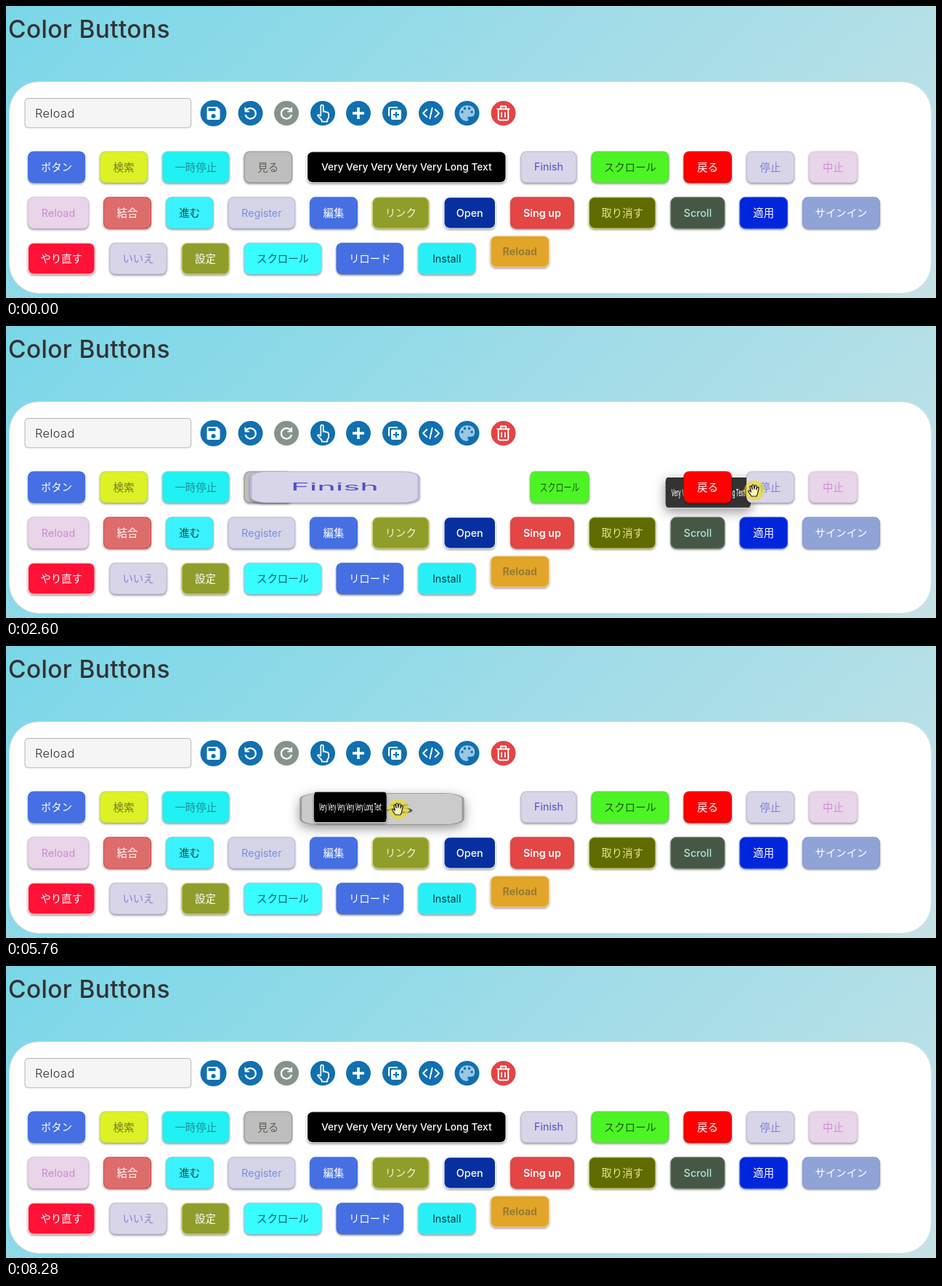
Animation, 1280 px wide and 403 px high, one loop 9.11 s. Source, as an HTML page with a canvas:

```html
<!DOCTYPE html>
<html lang="ja">
<head>
<meta charset="utf-8">
<title>Color Buttons</title>
<style>
html, body { margin: 0; width: 100%; height: 100%; overflow: hidden; }
canvas { display: block; }
</style>
</head>
<body>
<canvas id="stage" width="1280" height="403"></canvas>
<script>
const ctx = document.getElementById('stage').getContext('2d');
const LOOP = 9110, H = 43.8, GAP = 20, LAG = 28;
const SANS = 'Inter, "Noto Sans CJK JP", "Noto Sans CJK", sans-serif';
const CJK = '"Noto Sans CJK JP", "Noto Sans CJK", sans-serif';

// label, width, fill, text, border, weight
const ROWS = [
  [
    ['ボタン', 79, '#456fe2', '#fff'],
    ['検索', 66, '#dcf126', '#737c22', '#c9dc45', 300],
    ['一時停止', 92.5, '#20f1f3', '#1f8f98', '#55dfe6', 300],
    ['見る', 66.5, '#bebebe', '#5f5f54', '#8f8f8f', 300],
    ['Very Very Very Very Very Long Text', 274.5, '#000', '#fff', '#fff', 500],
    ['Finish', 77, '#d9d5e9', '#4f4dcb', '#b9b5df', 400],
    ['スクロール', 107, '#4df425', '#1b5a17', '#62d943', 300],
    ['戻る', 66.5, '#ff0000', '#fff', '#e00000'],
    ['停止', 66, '#d9d5e9', '#7d7fd4', '#bfbbe2', 300],
    ['中止', 67, '#e8d5e7', '#d58bdc', '#dcc3dd', 300]
  ],
  [
    ['Reload', 84, '#e8d5e7', '#cf86dd', '#dcc3dd', 400],
    ['結合', 66, '#dd6d6d', '#fff', '#e04545'],
    ['進む', 65.5, '#3af2ff', '#11505a', '#5adbe8'],
    ['Register', 92.5, '#d5d5e8', '#6f93e2', '#b9bce0', 400],
    ['編集', 66, '#456fe2', '#fff'],
    ['リンク', 78.5, '#8f9d2b', '#f5f5d8', '#d8dc60'],
    ['Open', 71.5, '#0630a0', '#fff', '#fff', 500],
    ['Sing up', 88, '#e44545', '#fff', '#e44545', 600],
    ['取り消す', 92.5, '#606c00', '#e8e48a', '#d8d860'],
    ['Scroll', 75, '#475745', '#a8e6dc', '#5d7a60', 500],
    ['適用', 66.5, '#0026dc', '#fff', '#2b4be8'],
    ['サインイン', 107, '#8fa3d6', '#fff', '#7f9ade']
  ],
  [
    ['やり直す', 92.5, '#ff1236', '#fff', '#fbd5da'],
    ['いいえ', 79, '#d9d5e9', '#8a80dd', '#bfbbe2', 300],
    ['設定', 66, '#8f9d2b', '#fff', '#d8dc60'],
    ['スクロール', 107, '#38fdff', '#12606e', '#6fd9ee', 300],
    ['リロード', 92.5, '#456fe2', '#fff'],
    ['Install', 79.5, '#26f0f5', '#113a44', '#5fe3ea', 400],
    ['Reload', 81.5, '#e2a52a', '#8d7a2e', '#f3dcae', 600]
  ]
];

const buttons = [];
ROWS.forEach((row, r) => {
  let x = 30;
  row.forEach(([label, w, fill, text, border = fill, weight = 400], i) => {
    const lifted = r === 2 && i === 6;
    buttons.push({ label, x, w, y: 200.5 + 63.1 * r - (lifted ? 9.7 : 0), fill, text, border, weight });
    x += w + GAP;
  });
});

// Pointer: time, x, y
const PATH = [
  [100, 1068, 376], [400, 880, 280], [790, 686, 221], [1199, 686, 221], [1200, 618, 221],
  [1350, 640, 220], [1500, 745, 218], [1700, 857, 217], [2200, 918, 219], [2600, 1030, 227],
  [3120, 1052, 224], [3540, 1046, 222], [3740, 955, 219], [4040, 803, 217], [4440, 640, 220],
  [4640, 607, 220], [4740, 600, 221], [5040, 385, 222], [5140, 366, 222], [5560, 366, 222],
  [5760, 540, 225], [5860, 610, 225], [6260, 614, 224], [6360, 625, 224], [6560, 595, 225],
  [6760, 492, 225], [7060, 385, 223], [7460, 366, 222], [7700, 366, 222], [8280, 915, 380]
];

// Each drag: active button, held time, grab point, [time, hovered slot]
const DRAGS = [
  { active: 4, from: 1200, to: 4740, grab: [607, 219], over: [[1400, 5], [1500, 6], [4240, 5], [4440, 4]] },
  { active: 3, from: 5560, to: 7460, grab: [359, 222], over: [[5660, 4], [6960, 3]] }
];
// Neighbours giving way: button, slot taken, start, end
const SHIFTS = [[5, 4, 1400, 4440], [6, 5, 1500, 4240], [4, 3, 5660, 6960]];

// The screen refreshes only at these moments
const TICKS = [0, 790, 1200, 1350, 3120, 7580];
[[100, 700], [1400, 2200], [2300, 3000], [3540, 4440], [4640, 5440],
 [5560, 5860], [6260, 6360], [6560, 7460], [7780, 8280]].forEach(([a, b]) => {
  for (let t = a; t <= b; t += 100) TICKS.push(t);
});
const snap = t => Math.max(...TICKS.filter(k => k <= t));

const clamp = v => Math.min(1, Math.max(0, v));
const ease = v => { const k = clamp(v); return k * k * (3 - 2 * k); };

function pointer(t) {
  const n = PATH.findIndex(p => p[0] > t);
  if (n <= 0) return PATH[n ? PATH.length - 1 : 0].slice(1);
  const a = PATH[n - 1], b = PATH[n], k = (t - a[0]) / (b[0] - a[0]);
  return [a[1] + (b[1] - a[1]) * k, a[2] + (b[2] - a[2]) * k];
}

const slotScale = (i, slot) => (buttons[slot].w + GAP) / (buttons[i].w + GAP);

// Offset and horizontal scale of every button
function layout(t) {
  const poses = buttons.map(() => ({ dx: 0, dy: 0, sx: 1, held: false }));
  for (const [i, slot, on, off] of SHIFTS) {
    const p = ease((t - on + 60) / 200) * (1 - ease((t - off) / 200));
    poses[i].dx = p * (buttons[slot].x - buttons[i].x);
    poses[i].sx = 1 + p * (slotScale(i, slot) - 1);
  }
  for (const d of DRAGS) {
    if (t < d.from || t >= d.to + 200) continue;
    const at = Math.min(t, d.to);
    const [x, y] = pointer(Math.max(d.from, at - LAG));
    const back = 1 - ease((t - d.to) / 200);
    let slot = d.active;
    for (const [when, s] of d.over) if (at >= when) slot = s;
    Object.assign(poses[d.active], {
      dx: (x - d.grab[0]) * back, dy: (y - d.grab[1]) * back,
      sx: slotScale(d.active, slot), held: t < d.to
    });
  }
  return poses;
}

function hits(b, p, [x, y]) {
  const cx = b.x + b.w / 2 + p.dx, top = b.y + p.dy;
  return Math.abs(x - cx) <= b.w * p.sx / 2 && y >= top && y <= top + H;
}

function roundRect(x, y, w, h, r) {
  ctx.beginPath();
  ctx.roundRect(x, y, w, h, r);
}

function shadow(color, blur, y) {
  ctx.shadowColor = color;
  ctx.shadowBlur = blur;
  ctx.shadowOffsetY = y;
}

function drawButton(b, p, hover) {
  const alpha = p.held ? 0.8 : hover ? 0.86 : 1;
  ctx.save();
  ctx.translate(b.x + b.w / 2 + p.dx, b.y + H / 2 + p.dy);
  ctx.scale(p.sx, 1);
  ctx.globalAlpha = alpha;
  if (p.held) shadow('rgba(0,0,0,.5)', 15, 5);
  else if (hover) shadow('rgba(0,0,0,.4)', 7, 3);
  else shadow('rgba(0,0,0,.42)', 3, 1.5);
  roundRect(-b.w / 2, -H / 2, b.w, H, 8);
  ctx.fillStyle = b.border;
  ctx.fill();
  shadow('transparent', 0, 0);
  roundRect(-b.w / 2 + 1, -H / 2 + 1, b.w - 2, H - 2, 7);
  if (alpha < 1) {
    ctx.globalAlpha = 1;
    ctx.fillStyle = '#fff';
    ctx.fill();
    ctx.globalAlpha = alpha;
  }
  ctx.fillStyle = b.fill;
  ctx.fill();
  const latin = b.label.charCodeAt(0) < 128;
  const size = latin ? (b.label.length > 20 ? 13.7 : 14.3) : 14.4;
  ctx.font = `${b.weight} ${size}px ${latin ? SANS : CJK}`;
  ctx.textAlign = 'center';
  ctx.globalAlpha = 1;
  ctx.fillStyle = b.text;
  ctx.fillText(b.label, 0, latin ? 5 : 5.2);
  ctx.restore();
}

const dot = (x, y, r) => `M${x - r} ${y}a${r} ${r} 0 1 0 ${2 * r} 0a${r} ${r} 0 1 0 ${-2 * r} 0z`;
const BLUE = '#1170b0';
const ICONS = [
  { x: 285.5, r: 18, fill: 'M17 3H5q-2 0-2 2v14q0 2 2 2h14q2 0 2-2V7zM15 9H5V5h10z' + dot(12, 16, 3) },
  { x: 336.5, line: 'M5 4v5.5h5.5M5.6 9A7.2 7.2 0 1 1 5 14', wide: 2.2 },
  { x: 386, color: '#87938a', line: 'M19 4v5.5h-5.5M18.4 9A7.2 7.2 0 1 0 19 14', wide: 2.2 },
  { x: 436, zoom: 1.1, line: 'M9.5 16V3.2a1.6 1.6 0 0 1 3.2 0v7q1.4-1.2 2.6.4 1.5-.8 2.3.6 1.8-.3 1.8 1.6v4.4l-1.7 3v2.3h-7v-2L5.6 15q.6-2.4 3.9.6', wide: 1.6 },
  { x: 485, line: 'M12 4v16M4 12h16', wide: 3.6 },
  { x: 535, line: 'M4 16V6q0-2 2-2h10', wide: 2, fill: 'M9 7h10q2 0 2 2v10q0 2-2 2H9q-2 0-2-2V9q0-2 2-2zM13 10v3h-3v2h3v3h2v-3h3v-2h-3v-3z' },
  { x: 585, zoom: 1.15, line: 'M7.5 7L2.5 12l5 5M16.5 7l5 5-5 5M13.6 5l-3.2 14', wide: 1.6 },
  { x: 634.5, zoom: 1.2, tint: '#9cc8e4', fill: 'M12 3a9 9 0 0 0 0 18q1.5 0 1.5-1.5 0-.6-.4-1-1.4-2.5 1.1-2.5H16q5 0 5-5 0-8-9-8z' +
      dot(6.5, 10.5, 1.5) + dot(9.5, 6.5, 1.5) + dot(14.5, 6.5, 1.5) + dot(17.5, 10.5, 1.5) },
  { x: 684.5, color: '#e24444', zoom: 1.05, line: 'M3.5 6.5h17M8.5 6V3h7v3M5.5 7v12q0 2 2 2h9q2 0 2-2V7M9.7 10.5v7M14.3 10.5v7', wide: 1.8 }
];

function drawIcon({ x, r = 17, color = BLUE, tint = '#fff', zoom = 1, fill, line, wide }) {
  ctx.save();
  ctx.translate(x, 148);
  ctx.fillStyle = color;
  ctx.beginPath();
  ctx.arc(0, 0, r, 0, 7);
  ctx.fill();
  ctx.scale(zoom, zoom);
  ctx.translate(-12, -12);
  ctx.fillStyle = ctx.strokeStyle = tint;
  ctx.lineWidth = wide;
  ctx.lineJoin = 'round';
  if (fill) ctx.fill(new Path2D(fill), 'evenodd');
  if (line) ctx.stroke(new Path2D(line));
  ctx.restore();
}

function drawText(text, x, y, font, spacing) {
  ctx.textAlign = 'left';
  ctx.fillStyle = '#333';
  ctx.font = `${font} ${SANS}`;
  ctx.letterSpacing = spacing;
  ctx.fillText(text, x, y);
  ctx.letterSpacing = '0px';
}

function drawPage() {
  const sky = ctx.createLinearGradient(219, -219, 1061, 622);
  sky.addColorStop(0, '#7ad7e8');
  sky.addColorStop(1, '#c6e2e7');
  ctx.fillStyle = sky;
  ctx.fillRect(0, 0, 1280, 403);
  drawText('Color Buttons', 3, 44, '500 33.4px', '0.4px');

  roundRect(4.5, 104.5, 1269, 292, 41);
  ctx.fillStyle = '#fff';
  ctx.fill();
  ctx.strokeStyle = '#d3dfe0';
  ctx.lineWidth = 1;
  ctx.stroke();

  roundRect(26, 127.5, 228.5, 40.5, 4);
  ctx.fillStyle = '#f5f5f5';
  ctx.fill();
  ctx.strokeStyle = '#b4b4b4';
  ctx.stroke();
  drawText('Reload', 40, 154, '300 16.4px', '0.4px');
  ICONS.forEach(drawIcon);
}

const ARROW = new Path2D('M0 0v16.5l3.8-3.5 2.8 6.4 2.8-1.2-2.8-6.2h5.2z');
const HAND = new Path2D('M-4 8l-4-6q-1-2 1-2l2.3 2-1.5-7q1-2.2 2.4 0l1 3.5-.5-5.5q1.3-2 2.6 0l.5 5 1-4.5q1.5-1.6 2.5.3l-.5 5 1.3-3q1.6-1 2.1.6l-1.7 8-1.5 3.6z');

function drawPointer([x, y], hand, pressed) {
  ctx.save();
  ctx.translate(x, y);
  if (pressed) {
    ctx.fillStyle = 'rgba(240,224,0,.58)';
    ctx.beginPath();
    ctx.arc(0, 0, 14, 0, 7);
    ctx.fill();
  }
  ctx.lineWidth = 1.2;
  ctx.lineJoin = 'round';
  ctx.fillStyle = hand ? (pressed ? '#fbf5b4' : '#fff') : '#333';
  ctx.strokeStyle = hand ? '#222' : '#55501c';
  if (!hand) ctx.translate(0, -2);
  const shape = hand ? HAND : ARROW;
  ctx.fill(shape);
  ctx.stroke(shape);
  ctx.restore();
}

function draw(time) {
  const t = snap(time % LOOP);
  const visible = t >= 100 && t < 8280;
  const at = pointer(t), poses = layout(t);
  const pressed = DRAGS.some(d => t >= d.from && t < d.to);
  const over = visible ? buttons.map((b, i) => hits(b, poses[i], at)) : [];
  drawPage();
  buttons.forEach((b, i) => drawButton(b, poses[i], !pressed && over[i]));
  if (visible) drawPointer(at, over.includes(true), pressed);
}

const start = performance.now();
function loop() {
  draw(performance.now() - start);
  requestAnimationFrame(loop);
}
loop();
</script>
</body>
</html>
```
